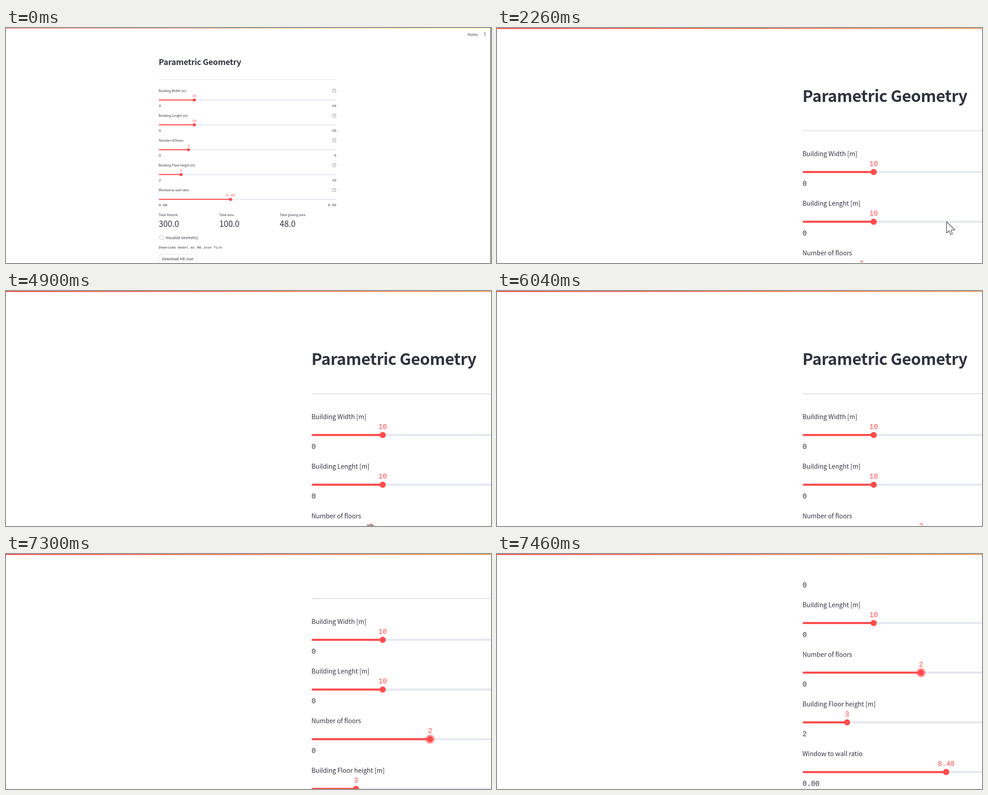
Recreate the animation shown at these times as an HTML page with a canvas. Size 1075x521 px, loop 8 s.

```html
<!DOCTYPE html>
<html lang="en">
<head>
<meta charset="utf-8">
<title>Parametric Geometry</title>
<style>
  html, body { margin: 0; width: 100%; height: 100%; overflow: hidden; background: #fff; }
  canvas { display: block; width: 1075px; height: 521px; }
</style>
</head>
<body>
<canvas id="stage" width="1075" height="521"></canvas>
<script>
const ctx = document.getElementById('stage').getContext('2d');
const LOOP = 8000;
const SANS = '"Noto Sans CJK JP", "Noto Sans CJK SC", "Noto Sans CJK", "Noto Sans", sans-serif';
const MONO = '"Liberation Mono", monospace';
const RED = '#ff4b4b', INK = '#31333f', TRACK = '#e5e8f1', LINE = '#d9dade';

// Page layout is measured at full zoom.
const PAGE_W = 2150, LEFT = 677.5, WIDTH = 787, RIGHT = LEFT + WIDTH;
const PITCH = 110.15, HEADER_H = 51;

const sliders = [
  { label: 'Building Width [m]', min: '0', max: '50', text: '10', at: 10 / 50 },
  { label: 'Building Lenght [m]', min: '0', max: '50', text: '10', at: 10 / 50 },
  { label: 'Number of floors', min: '0', max: '6', text: '1', at: 1 / 6 },
  { label: 'Building Floor height [m]', min: '2', max: '10', text: '3', at: 1 / 8 },
  { label: 'Window to wall ratio', min: '0.00', max: '0.99', text: '0.40', at: 0.4 / 0.99 }
];
const metrics = [['Total Volume', '300.0'], ['Total area', '100.0'], ['Total glazing area', '48.0']];

// Each key is [time, value...]; the latest one reached holds.
const zoomKeys = [[0, 1], [190, 1.5], [220, 2]];
const scrollKeys = [[0, 0], [7220, 48], [7300, 129], [7380, 214], [7460, 276.5]];
const arrowKeys = [
  [0], [2260, 996, 429], [2330, 833, 419], [2750, 813, 437],
  [2830, 836, 460], [2910, 855, 478], [3160, 842, 505], [3230]
];
const FLOORS_AT = 6040, BEAM_FROM = 4900, BEAM_TO = 5390;

const hold = (keys, t) => keys.filter(k => k[0] <= t).pop().slice(1);

function text(str, x, y, size, { family = SANS, color = INK, align = 'left', weight = 400, gap = 0 } = {}) {
  ctx.font = `${weight} ${size}px ${family}`;
  ctx.letterSpacing = gap + 'px';
  ctx.textAlign = align;
  ctx.fillStyle = color;
  ctx.fillText(str, x, y);
}

const mono = (str, x, y, align, color) => text(str, x, y, 15.65, { family: MONO, align, color });

function disc(x, y, r, color) {
  ctx.fillStyle = color;
  ctx.beginPath();
  ctx.arc(x, y, r, 0, Math.PI * 2);
  ctx.fill();
}

function bar(x, y, w, h, r, color) {
  ctx.fillStyle = color;
  ctx.beginPath();
  ctx.roundRect(x, y, w, h, r);
  ctx.fill();
}

function frame(x, y, w, h, r, color) {
  ctx.strokeStyle = color;
  ctx.lineWidth = 1.6;
  ctx.beginPath();
  ctx.roundRect(x, y, w, h, r);
  ctx.stroke();
}

function helpIcon(x, y) {
  ctx.strokeStyle = '#74767f';
  ctx.lineWidth = 1.6;
  ctx.beginPath();
  ctx.arc(x, y, 7.8, 0, Math.PI * 2);
  ctx.stroke();
  text('?', x, y + 4.3, 11.5, { align: 'center', color: '#74767f' });
}

function slider(s, dy, focused) {
  const x = LEFT + WIDTH * s.at, y = 319.3 + dy;
  text(s.label, 677, 284 + dy, 14);
  helpIcon(1455, 278 + dy);
  bar(LEFT, y - 2.25, WIDTH, 4.5, 2.2, TRACK);
  bar(LEFT, y - 2.25, x - LEFT, 4.5, 2.2, RED);
  if (focused) disc(x, y, 10.3, 'rgba(255,75,75,0.5)');
  disc(x, y, 6.8, RED);
  mono(s.text, x, 306 + dy, 'center', RED);
  mono(s.min, 677.3, 350 + dy);
  mono(s.max, RIGHT, 350 + dy, 'right');
}

function page(floorsSet) {
  text('Parametric Geometry', 677, 164, 35.5, { weight: 600, gap: -0.5 });
  ctx.fillStyle = LINE;
  ctx.fillRect(LEFT, 227, WIDTH, 1.6);

  sliders.forEach((s, i) => {
    const moved = i === 2 && floorsSet;
    slider(moved ? { ...s, text: '2', at: 2 / 6 } : s, i * PITCH, moved);
  });

  metrics.forEach(([label, value], i) => {
    const x = 677 + i * 268.3;
    text(label, x, 834, 14);
    text(value, x, 881, 36);
  });

  frame(680, 921, 16.5, 16, 3, '#b4b5bb');
  text('Visualize Geometry', 708, 935.5, 16);
  mono('Download model as HB Json file', 677, 978);
  frame(677.5, 1003, 169, 43, 9, LINE);
  text('Download HB Json', 691, 1030, 16);
}

function header() {
  ctx.fillStyle = '#fff';
  ctx.fillRect(0, 0, PAGE_W, HEADER_H);
  const g = ctx.createLinearGradient(0, 0, PAGE_W, 0);
  g.addColorStop(0, RED);
  g.addColorStop(1, '#fffd80');
  ctx.fillStyle = g;
  ctx.fillRect(0, 0, PAGE_W, 2.2);
  text('Deploy', 2046, 33, 14);
  for (const y of [21, 27, 33]) disc(2123, y, 1.9, INK);
  ctx.fillStyle = '#222';
  ctx.fillRect(2148, 0, 2, 1042);
}

function arrow(x, y) {
  ctx.save();
  ctx.translate(x + 0.5, y + 0.5);
  ctx.beginPath();
  [[0, 0], [0, 25], [5.5, 20.2], [9.2, 28.5], [13, 27], [9.6, 18.8], [18.5, 18.2]]
    .forEach(p => ctx.lineTo(...p));
  ctx.closePath();
  ctx.fillStyle = '#fff';
  ctx.fill();
  ctx.strokeStyle = '#48444f';
  ctx.lineWidth = 1.3;
  ctx.lineJoin = 'round';
  ctx.stroke();
  ctx.restore();
}

function beam(x, y) {
  ctx.fillStyle = INK;
  ctx.fillRect(x, y, 6, 1.5);
  ctx.fillRect(x + 9, y, 6, 1.5);
  ctx.fillRect(x + 6.75, y + 1, 1.5, 24);
}

function draw(t) {
  const [zoom] = hold(zoomKeys, t), [scroll] = hold(scrollKeys, t);
  ctx.setTransform(1, 0, 0, 1, 0, 0);
  ctx.fillStyle = '#fff';
  ctx.fillRect(0, 0, 1075, 521);
  ctx.scale(zoom / 2, zoom / 2);
  ctx.save();
  ctx.translate(0, -scroll);
  page(t >= FLOORS_AT);
  ctx.restore();
  header();

  const tip = hold(arrowKeys, t);
  if (tip.length) arrow(...tip);
  if (t >= BEAM_FROM && t < BEAM_TO) beam(800, 518.5);
}

const start = performance.now();
function tick() {
  draw((performance.now() - start) % LOOP);
  requestAnimationFrame(tick);
}
tick();
</script>
</body>
</html>
```
